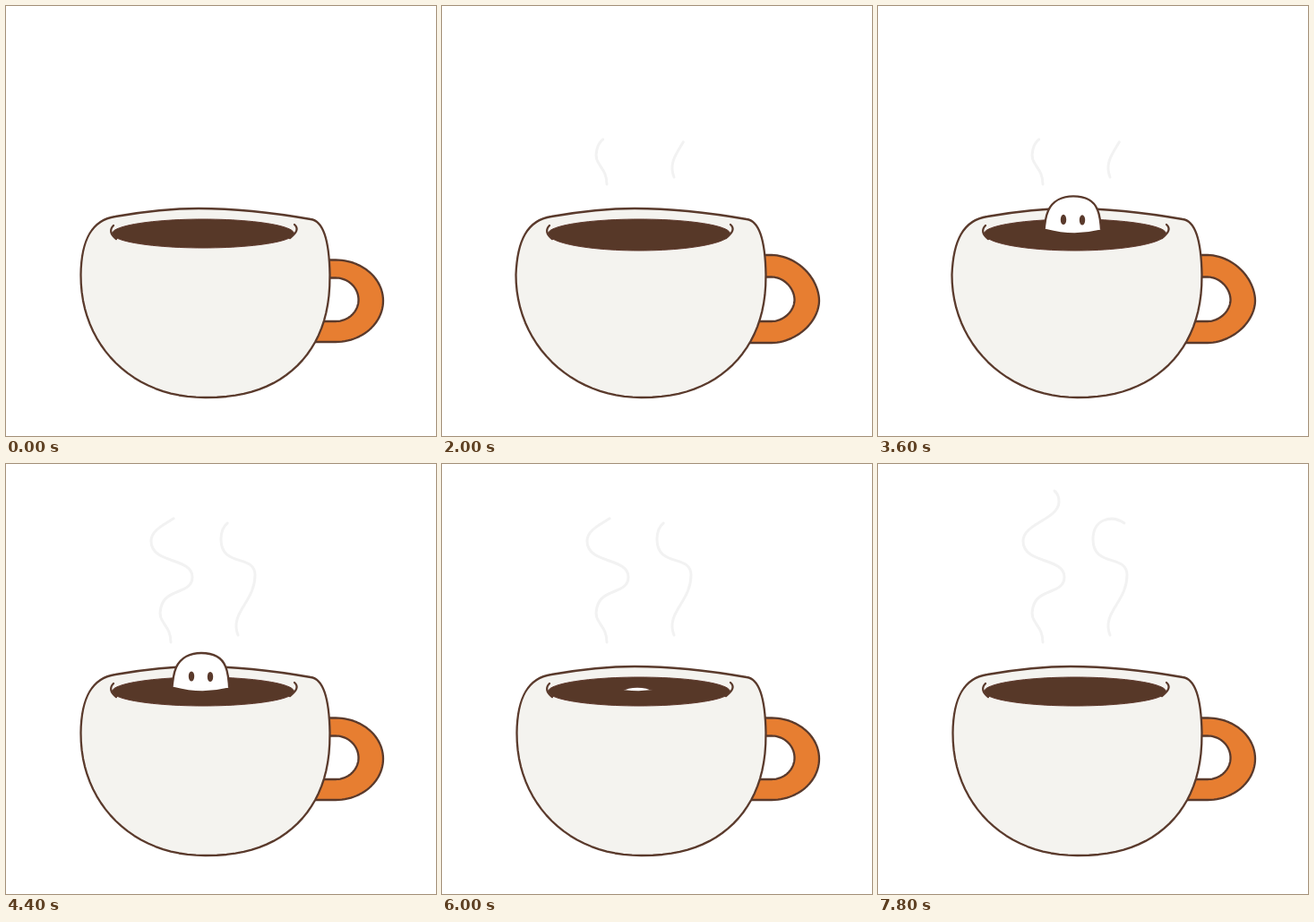
An HTML page for the animation above (8000 ms loop, 480 px wide and 480 px high).

```html
<!DOCTYPE html>
<html lang="en">
<head>
<meta charset="utf-8">
<title>Coffee cup</title>
<style>
  html, body { margin: 0; width: 100%; height: 100%; overflow: hidden; background: #fff; }
  svg { display: block; width: 100%; height: 100%; }
  .ink { stroke: #5a3a2c; stroke-width: 2.3; stroke-linecap: round; stroke-linejoin: round; }
  .steam { fill: none; stroke: #f2f2f2; stroke-width: 3; stroke-linecap: round; }
</style>
</head>
<body>
<svg viewBox="0 0 480 480">
  <clipPath id="surface"><path d="M160 0H280V249Q268 249 246 250Q218 257 188 249H160Z"/></clipPath>
  <path class="steam" pathLength="1" d="M184 199C184 178 168 178 173 160C178 138 208 146 208 126C208 104 162 112 162 86C162 66 202 62 202 42Q202 34 197 30"/>
  <path class="steam" pathLength="1" d="M259 191C249 166 278 154 278 124C278 100 240 116 240 84C240 62 260 56 275 66"/>
  <path class="ink" id="handle" fill="#e77e31" fill-rule="evenodd"/>
  <path class="ink" id="cup" fill="#f4f3ef"/>
  <path id="coffee" fill="#573828" stroke="#5f392d"/>
  <path class="ink" fill="none" d="M120 245Q113 252 123 260M322 244Q329 250 317 259"/>
  <g clip-path="url(#surface)">
    <g id="ghost">
      <path class="ink" fill="#fff" d="M185 266C185 249 186 237 190 228C195 217 206 212 218 212C231 212 241 217 245 227C249 236 249.5 249 249.5 266"/>
      <g fill="#5a3a2c">
        <ellipse cx="207" cy="238" rx="3.2" ry="5.6"/>
        <ellipse cx="228" cy="238.500" rx="3.2" ry="5.6"/>
      </g>
    </g>
  </g>
</svg>
<script>
const STEP = 200, LOOP = 8000, CYCLE = 8;
const RIM = "C84 262 95 239 122 235C145 231 180 226 215 226C262 226 300 231 340 238C357 240 361 270 361.5 300Z";
const el = id => document.getElementById(id);
const steams = document.querySelectorAll(".steam");
const ghost = el("ghost");

// Points along a quarter of a superellipse, angles in quarter turns.
function quarter(cx, cy, rx, ry, n, from) {
  const pts = [];
  for (let i = 0; i <= 24; i++) {
    const a = (from + i / 24) * Math.PI / 2;
    const round = v => Math.sign(v) * Math.abs(v) ** (2 / n);
    pts.push((cx + rx * round(Math.cos(a))).toFixed(2) + " " + (cy + ry * round(Math.sin(a))).toFixed(2));
  }
  return pts.join("L");
}

// Right half of an oval, left open behind the cup wall.
const loop = (cx, cy, rx, top, bottom, n) =>
  `M340 ${cy - top}L${quarter(cx, cy, rx, top, n, 3)}L${quarter(cx, cy, rx, bottom, n, 0)}H340Z`;

const cupPath = w =>
  `M${quarter(222.5, 300, 139, 137, 2.3 - .06 * w, 0)}L${quarter(222.5, 300, 139 + w, 137, 2.1 - .06 * w, 1)}${RIM}`;

const coffeePath = w => {
  const half = (ry, from) =>
    quarter(220, 254, 101.5, ry, 2, from) + "L" + quarter(220, 254, 101.5, ry, 2, from + 1);
  return `M${half(16 + 3 * w, 0)}L${half(16, 2)}Z`;
};

const handlePath = w =>
  loop(368, 329, 53, 45.5 + 5.5 * w, 46 + w, 2 - .13 * w) +
  loop(368, 328, 25.5, 24.5 + w, 24, 2 - .1 * w);

const ease = x => {
  x = Math.max(0, Math.min(1, x));
  return x * x * (3 - 2 * x);
};

function draw(time) {
  const t = Math.floor((time % LOOP) / STEP) * STEP;
  const k = (t / STEP) % CYCLE;

  // The outline bulges once early in every cycle.
  const w = Math.max(0, 1 - Math.abs(k - 2) / 2);
  el("cup").setAttribute("d", cupPath(w));
  el("coffee").setAttribute("d", coffeePath(w));
  el("handle").setAttribute("d", handlePath(w));

  const grown = (k / (CYCLE - 1)) ** 1.16;
  for (const s of steams) {
    s.setAttribute("stroke-dasharray", grown + " 2");
    s.style.visibility = k ? "visible" : "hidden";
  }

  const up = ease((t - 2800) / 900) * ease((6200 - t) / 900);
  ghost.setAttribute("transform", `translate(0 ${(42 - 43 * up).toFixed(2)})`);
  ghost.style.visibility = up ? "visible" : "hidden";
}

const start = performance.now();
function tick() {
  draw(performance.now() - start);
  requestAnimationFrame(tick);
}
draw(0);
requestAnimationFrame(tick);
</script>
</body>
</html>
```
